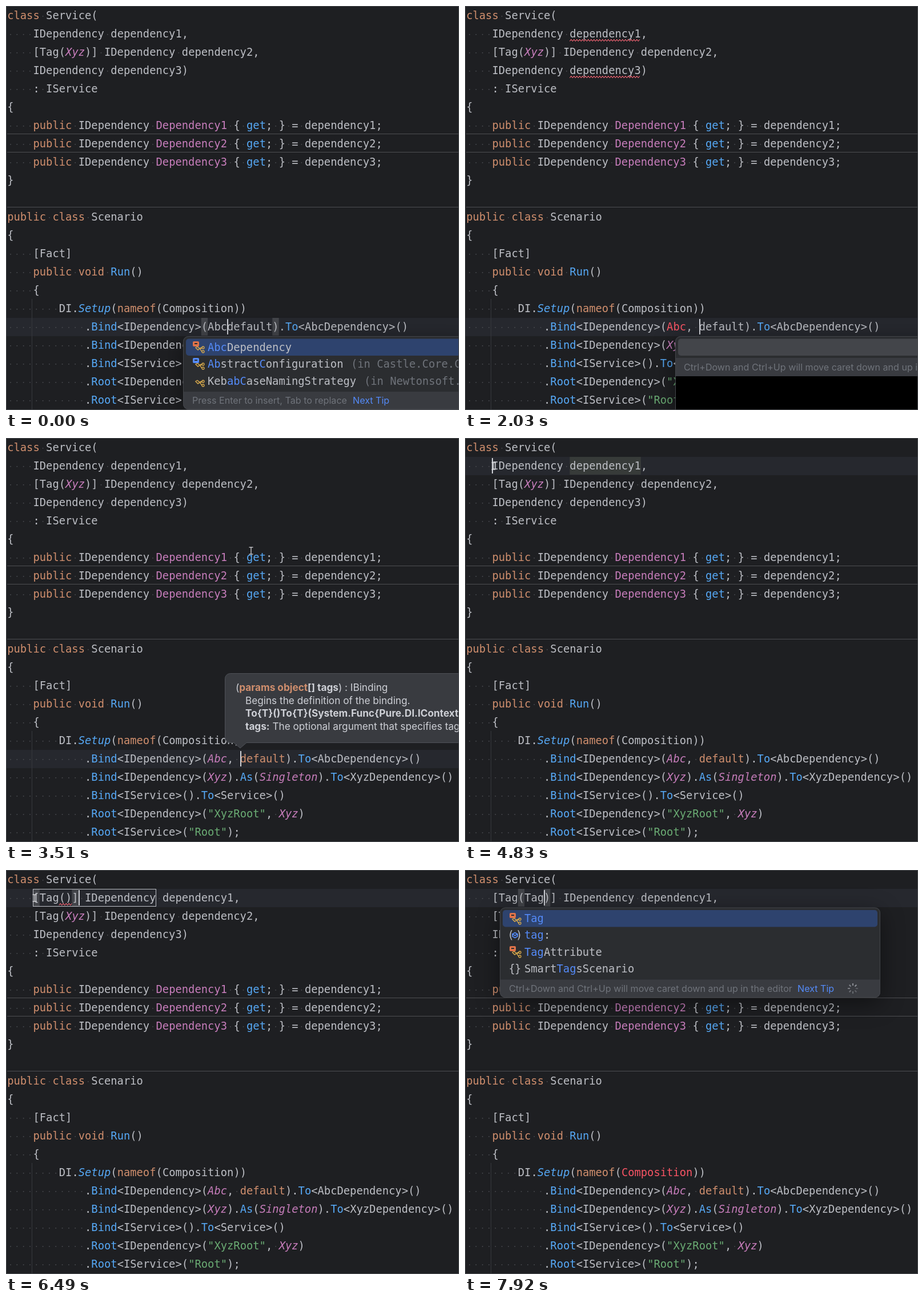
An HTML page with a canvas for the animation above (8 s loop, 793 by 706 pixels).

```html
<!DOCTYPE html>
<html>
<head>
<meta charset="utf-8">
<title>Code editor</title>
<style>
html, body { margin: 0; width: 793px; height: 706px; overflow: hidden; background: #1e1f22; }
canvas { display: block; }
</style>
</head>
<body>
<canvas id="stage" width="793" height="706"></canvas>
<script>
const ctx = document.getElementById('stage').getContext('2d');
const W = 793, H = 706, LOOP = 8000, ROW = 32, CW = 11.32, X0 = 2.2;
const MONO = '18.8px "DejaVu Sans Mono", monospace';
const UI = '16.1px Inter, sans-serif', DOC = '17.2px Inter, sans-serif', DOC_BOLD = 'bold ' + DOC;
const TEXT = '#bcbec4', BLUE = '#56a8f5', RED = '#f75464', GREY = '#6f737a', LINK = '#548af7',
  ORANGE = '#cf8e6d', PANEL = '#2b2d30', FOOTER = '#393b40', EDGE = '#43454a';
const COLORS = { str: '#6aab73', kw: ORANGE, fn: BLUE, fnItalic: BLUE, prop: '#c77dbb', enumItalic: '#c77dbb', plain: TEXT };
const TOKENS = new RegExp('(?<str>"[^"]*")|\\b(?:(?<kw>class|public|void|nameof|default)|(?<fn>get|Run|Bind|To|As|Root)|' +
  '(?<fnItalic>Setup)|(?<prop>Dependency\\d)|(?<enumItalic>Abc|Xyz|Singleton))\\b|(?<plain>\\w+|[^\\s\\w"]+)', 'g');

const property = n => `    public IDependency Dependency${n} { get; } = dependency${n};`;
const CODE = [
  'class Service(',
  '',
  '    [Tag(Xyz)] IDependency dependency2,',
  '    IDependency dependency3)',
  '    : IService',
  '{',
  property(1), property(2), property(3),
  '}',
  '',
  'public class Scenario',
  '{',
  '    [Fact]',
  '    public void Run()',
  '    {',
  '        DI.Setup(nameof(Composition))',
  '',
  '            .Bind<IDependency>(Xyz).As(Singleton).To<XyzDependency>()',
  '            .Bind<IService>().To<Service>()',
  '            .Root<IDependency>("XyzRoot", Xyz)',
  '            .Root<IService>("Root");'
];

// Timed states: [start, ...values]
const TAG = [[0, ''], [5610, '[Tag()]'], [5730, '[Tag()] '], [7540, '[Tag(T)] '], [7680, '[Tag(Ta)] '], [7800, '[Tag(Tag)] ']];
const ARGS = [[0, 'Abcdefault'], [1330, 'Abc,default'], [1480, 'Abc, default']];
const CARET = [[0, 17, 34], [1330, 17, 35], [1480, 17, 36], [4680, 1, 4], [5610, 1, 11], [5730, 1, 12],
  [6370, 1, 11], [6610, 1, 10], [6730, 1, 9], [7540, 1, 10], [7680, 1, 11], [7800, 1, 12]];
const BRACKETS = [[0, 17, 30, 41], [550], [6490, 1, 4, 10], [6610, 1, 8, 9], [7540, 1, 8, 10], [7680, 1, 8, 11], [7800, 1, 8, 12]];
const MOUSE = [[0], [3000, 559, 239], [3140, 527, 221], [3510, 429, 197], [3660, 217.5, 134], [3810, 150, 65],
  [3930, 108, 30], [4080, 80, 25], [4200, 66, 30], [4320, 57, 40], [4440, 50, 49], [7540]];

const at = (states, t) => states.findLast(s => s[0] <= t).slice(1);
const during = (t, from, to) => t >= from && t < to;
const colX = col => X0 + col * CW;
const rowY = row => 1 + row * ROW;

function rect(x, y, w, h, color) {
  ctx.fillStyle = color;
  ctx.fillRect(x, y, w, h);
}

function round(x, y, w, h, r, color) {
  ctx.beginPath();
  ctx.roundRect(x, y, w, h, r);
  ctx.fillStyle = color;
  ctx.fill();
}

function line(points, color, width = 1) {
  ctx.beginPath();
  points.forEach(([x, y]) => ctx.lineTo(x, y));
  ctx.strokeStyle = color;
  ctx.lineWidth = width;
  ctx.stroke();
}

// Draws [text, color, font] pieces one after another
function run(x, y, ...pieces) {
  for (const [text, color = TEXT, font = MONO] of pieces) {
    ctx.font = font;
    ctx.fillStyle = color;
    ctx.fillText(text, x, y);
    x += ctx.measureText(text).width;
  }
}

function codeLine(row, text, override) {
  const base = rowY(row) + 22;
  [...text].forEach((c, i) => c === ' ' && rect(colX(i) + 5, base - 6, 1.6, 1.6, '#4b4d52'));
  for (const m of text.matchAll(TOKENS)) {
    const kind = Object.keys(COLORS).find(k => m.groups[k]);
    const forced = override[m[0]];
    const slant = !forced && kind.endsWith('Italic') ? 'italic ' : '';
    run(colX(m.index), base, [m[0], forced || COLORS[kind], slant + MONO]);
  }
}

function wave(row, from, to) {
  const points = [];
  for (let x = colX(from), i = 0; x < colX(to); x += 2.5, i++) points.push([x, rowY(row) + (i % 2 ? 25.5 : 28.5)]);
  line(points, '#fa6675', 1.1);
}

function markWord(row, text, word) {
  const col = text.search(new RegExp('\\b' + word + '\\b'));
  if (col >= 0) rect(colX(col), rowY(row), word.length * CW, ROW - 1, '#373b39');
}

function popup(x, y, w, h, footer, selection, selectionWidth) {
  ctx.save();
  ctx.shadowColor = 'rgba(0,0,0,.45)';
  ctx.shadowBlur = 40;
  ctx.shadowOffsetY = 10;
  round(x, y, w, h, 9, PANEL);
  ctx.restore();
  ctx.save();
  ctx.beginPath();
  ctx.roundRect(x, y, w, h, 9);
  ctx.clip();
  rect(x, y + footer, w, h, FOOTER);
  ctx.restore();
  round(x + 5, y + 4.5, selectionWidth, 29.5, 5, selection);
  ctx.beginPath();
  ctx.roundRect(x + .5, y + .5, w - 1, h - 1, 9);
  ctx.strokeStyle = EDGE;
  ctx.lineWidth = 1;
  ctx.stroke();
}

function nodes(x, y) {
  const gold = '#d6a84b';
  line([[x - 2, y - 2], [x + 2, y + 2], [x - 1, y + 4], [x - 5, y], [x - 2, y - 2]], gold, 1.5);
  line([[x + 2, y + 1], [x + 6, y], [x + 3, y + 3], [x + 6, y + 7]], gold, 1.3);
  for (const dy of [0, 7]) {
    ctx.beginPath();
    ctx.arc(x + 8, y + dy, 2, 0, 7);
    ctx.strokeStyle = gold;
    ctx.stroke();
  }
}

function classIcon(x, y, color) {
  nodes(x + 10, y + 1);
  if (!color) return;
  round(x, y - 10, 11, 9, 2, color);
  rect(x + 3, y - 7, 5, 2, PANEL);
}

function insertPopup() {
  popup(310, 577, 500, 128, 97, '#2e436e', 500);
  classIcon(327, 596, '#e0734a');
  run(353, 602.5, ['Abc', LINK], ['Dependency']);
  classIcon(327, 625, LINK);
  run(353, 632, ['Ab', LINK], ['stract'], ['C', LINK], ['onfiguration']);
  run(604, 632, ['(in Castle.Core.Configuration)', GREY]);
  classIcon(327, 655);
  run(353, 661.5, ['Keb'], ['abC', LINK], ['aseNamingStrategy']);
  run(627, 661.5, ['(in Newtonsoft.Json)', GREY]);
  run(326, 695, ['Press Enter to insert, Tab to replace', GREY, UI]);
  run(607, 695, ['Next Tip', LINK, UI]);
}

const CARET_TIP = 'Ctrl+Down and Ctrl+Up will move caret down and up in the editor';

function emptyPopup() {
  popup(368, 577, 500, 140, 38, EDGE, 500);
  rect(369, 647, W, H, '#000');
  run(383, 636.5, [CARET_TIP, GREY, UI]);
}

function tagPopup() {
  popup(61, 65.5, 666, 157.5, 126, '#2e436e', 656);
  classIcon(78, 85, '#e0734a');
  run(104, 91, ['Tag', LINK]);
  run(74.5, 120, ['(']);
  run(89, 120, [')']);
  line([[83, 112], [87.5, 109.5], [92, 112], [92, 116], [87.5, 118.5], [83, 116], [83, 112], [87.5, 114.5], [92, 112]], LINK, 1.6);
  run(104, 120, ['tag', LINK], [':']);
  classIcon(78, 143, '#e0734a');
  run(104, 149.5, ['Tag', LINK], ['Attribute']);
  run(76.5, 179, ['{']);
  run(87, 179, ['}']);
  run(104, 179, ['Smart'], ['Tag', LINK], ['sScenario']);
  run(77, 213, [CARET_TIP, GREY, UI]);
  run(582, 213, ['Next Tip', LINK, UI]);
  for (let i = 0; i < 8; i++) {
    const c = Math.cos(i * Math.PI / 4), s = Math.sin(i * Math.PI / 4);
    line([[679 + 5 * c, 207 + 5 * s], [679 + 9 * c, 207 + 9 * s]], `rgba(160,163,170,${.3 + i * .08})`, 2);
  }
}

function parameterHint() {
  ctx.beginPath();
  ctx.moveTo(W + 9, 411.5);
  ctx.arcTo(383.5, 411.5, 383.5, 440, 9);
  ctx.arcTo(383.5, 532.5, 400, 532.5, 9);
  for (const [x, y] of [[399, 532.5], [410, 542], [421, 532.5], [W + 9, 532.5]]) ctx.lineTo(x, y);
  ctx.closePath();
  ctx.fillStyle = FOOTER;
  ctx.fill();
  ctx.strokeStyle = '#4e5157';
  ctx.lineWidth = 1;
  ctx.stroke();
  const hint = '#ced0d6';
  run(402, 442, ['(', hint, DOC], ['params object', ORANGE, DOC_BOLD], ['[] tags', hint, DOC_BOLD], [') : IBinding', hint, DOC]);
  run(419, 464.5, ['Begins the definition of the binding.', hint, DOC]);
  run(419, 487, ['To{T}()To{T}(System.Func{Pure.DI.IContext', hint, DOC_BOLD]);
  run(419, 510, ['tags:', hint, DOC_BOLD], [' The optional argument that specifies tags', hint, DOC]);
}

function draw(t) {
  const [tag] = at(TAG, t), [args] = at(ARGS, t);
  const lines = [...CODE];
  lines[1] = `    ${tag}IDependency dependency1,`;
  lines[17] = `            .Bind<IDependency>(${args}).To<AbcDependency>()`;

  rect(0, 0, W, H, '#1e1f22');
  rect(1, rowY(t < 4830 ? 17 : 1), W, ROW, '#26282e');
  if (during(t, 4830, 6370)) markWord(1, lines[1], 'dependency1');
  if (during(t, 4950, 6370)) lines.forEach((text, row) => markWord(row, text, 'IDependency'));
  const [bracketRow, ...brackets] = at(BRACKETS, t);
  brackets.forEach(col => rect(colX(col), rowY(bracketRow), CW, ROW - 1, EDGE));

  for (const y of [223, 255, 351]) rect(2, y, W, 1, '#4d4e52');
  rect(45, 512, 1, H, '#36383d');

  const overrides = {
    16: t >= 6850 ? { Composition: RED } : {},
    17: t < 3510 ? { Abc: t < 1600 ? TEXT : RED, default: TEXT, Abcdefault: t < 550 ? TEXT : RED } : {}
  };
  lines.forEach((text, row) => codeLine(row, text, overrides[row] || {}));

  if (during(t, 800, 2150)) [1, 3].forEach(row => wave(row, 16, 27));
  if (during(t, 5980, 7920)) wave(1, 8, tag.indexOf(')') + 5);
  if (during(t, 5730, 7920)) {
    ctx.strokeStyle = TEXT;
    ctx.lineWidth = 1;
    ctx.strokeRect(47.5, 33.5, Math.round((tag.length + 11) * CW), 30);
  }

  const [caretRow, caretCol] = at(CARET, t);
  rect(Math.round(colX(caretCol)), rowY(caretRow) + 2, 2, 27, '#ced0d6');

  if (t < 400) insertPopup();
  if (during(t, 2030, 2520)) emptyPopup();
  if (during(t, 2640, 3660)) parameterHint();
  if (t >= 7920) tagPopup();

  const [mx, my] = at(MOUSE, t);
  if (mx) {
    line([[mx, my - 6], [mx, my + 6]], '#e4e5e8', 1.2);
    for (const dy of [-6, 6]) line([[mx - 3.5, my + dy], [mx + 3.5, my + dy]], '#e4e5e8', 1.2);
  }
  ctx.strokeStyle = '#4a4c50';
  ctx.lineWidth = 1;
  ctx.strokeRect(.5, .5, W - 1, H - 1);
}

const start = performance.now();
function tick() {
  draw((performance.now() - start) % LOOP);
  requestAnimationFrame(tick);
}
tick();
</script>
</body>
</html>
```
